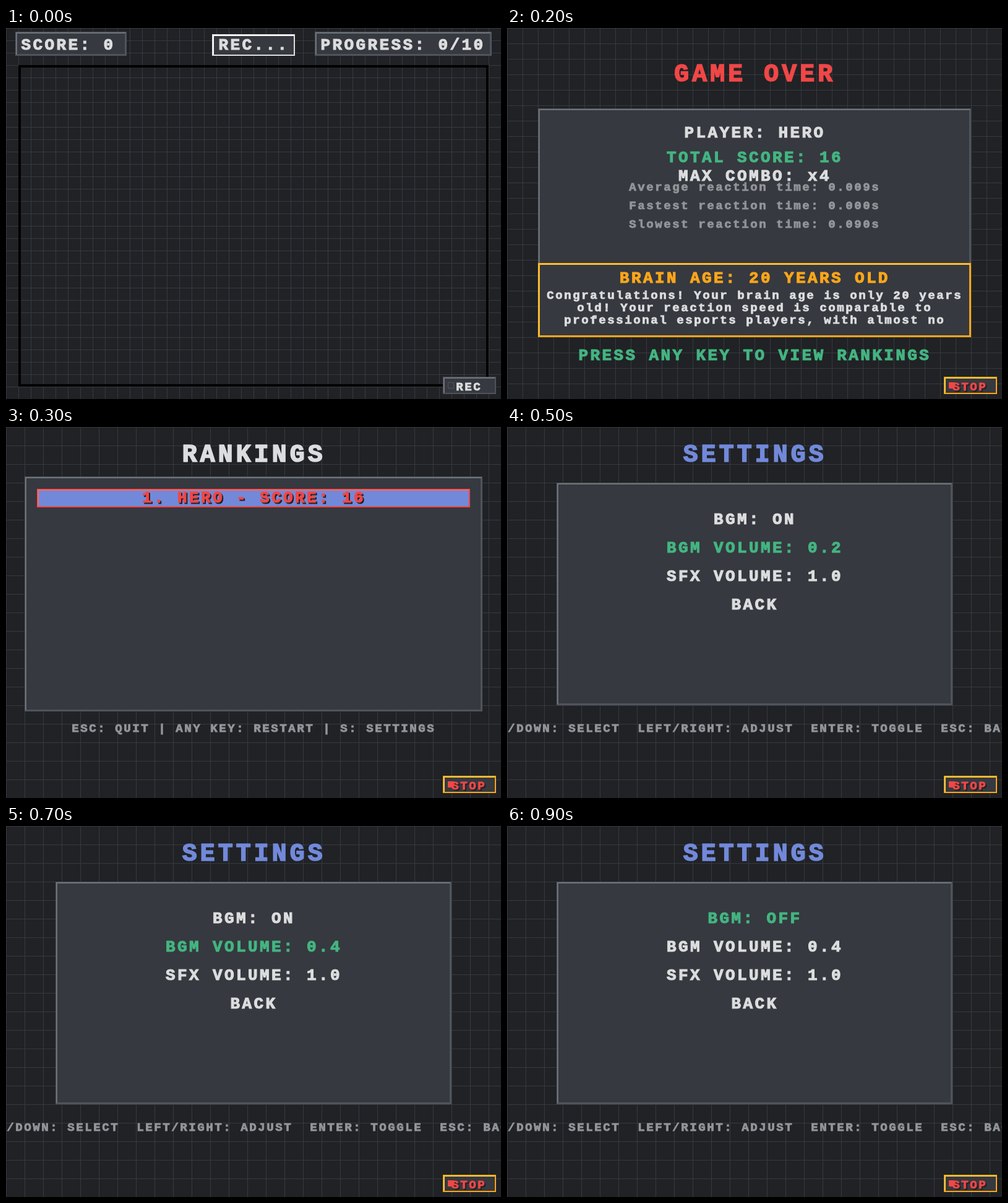
These frames come from a looping animation (800x600 px, 1000 ms). An HTML page with a canvas:

```html
<!DOCTYPE html>
<html lang="en">
<head>
<meta charset="utf-8">
<title>Reaction game</title>
<style>
html, body { margin: 0; width: 100%; height: 100%; overflow: hidden; background: #202225; }
canvas { display: block; }
</style>
</head>
<body>
<canvas id="stage" width="800" height="600"></canvas>
<script>
const ctx = document.getElementById('stage').getContext('2d');
const BG = '#202225', PANEL = '#36393f', WHITE = '#dcddde', GRAY = '#929599';
const RED = '#f04747', GREEN = '#43b581', BLUE = '#7289da', GOLD = '#faa61a';
const EDGE = '#4f545c';
const LIGHT = { [EDGE]: '#6d727a', [WHITE]: '#fafbfc', [GOLD]: '#ffc438', [RED]: '#ff6565' };
const SMALL = 14, BODY = 19, TITLE = 29; // character pitch of each text size

function rect(x, y, w, h, color) {
  ctx.fillStyle = color;
  ctx.fillRect(x, y, w, h);
}

function frame(x, y, w, h, line, color) {
  ctx.strokeStyle = color;
  ctx.lineWidth = line;
  ctx.strokeRect(x + line / 2, y + line / 2, w - line, h - line);
}

// Box with a lighter line along its top and left edges
function bevel(x, y, w, h, line = 3, edge = EDGE, fill = PANEL) {
  rect(x, y, w, h, fill);
  frame(x, y, w, h, line, edge);
  rect(x + 1, y + 1, w - 3, 2, LIGHT[edge]);
  rect(x + 1, y + 1, 2, h - 3, LIGHT[edge]);
}

function text(str, x, y, pitch, color, shadow) {
  const size = pitch * 1.37, gap = pitch - size * 0.6;
  const left = x + gap / 2 - pitch / 16;
  ctx.font = `bold ${size}px "Liberation Mono", monospace`;
  ctx.letterSpacing = gap + 'px';
  ctx.lineWidth = pitch * 0.06;
  const put = (offset, ink) => {
    ctx.fillStyle = ctx.strokeStyle = ink;
    ctx.fillText(str, left + offset, y + offset);
    ctx.strokeText(str, left + offset, y + offset);
  };
  if (shadow) put(2, BG);
  put(0, color);
}

function center(str, y, pitch, color, shadow) {
  text(str, 400 - str.length * pitch / 2, y, pitch, color, shadow);
}

function grid(step) {
  rect(0, 0, 800, 600, BG);
  for (let x = 0; x < 800; x += step) rect(x, 0, 1, 600, PANEL);
  for (let y = 0; y < 600; y += step) rect(0, y, 800, 1, PANEL);
}

function recButton(active) {
  bevel(706, 564, 86, 28, 2, active ? GOLD : EDGE);
  if (active) {
    rect(714, 573, 10, 10, RED);
    text('STOP', 720, 586, SMALL, RED, true);
  } else {
    frame(714, 573, 10, 10, 1, EDGE);
    text('REC', 727, 586, SMALL, WHITE);
  }
}

function game(count) {
  grid(20);
  frame(20, 60, 760, 520, 4, '#000');
  bevel(15, 6, 180, 39);
  text('SCORE: 0', 24, 35, BODY, WHITE);
  bevel(333, 10, 134, 35, 2, WHITE);
  text('REC...', 343, 35, BODY, WHITE);
  bevel(499, 6, 286, 39);
  text(`PROGRESS: ${count}/10`, 508, 35, BODY, WHITE);
  if (count) {
    rect(561, 352, 96, 42, '#55ff55');
    frame(561, 352, 96, 42, 3, '#2dcd2d');
    frame(564, 355, 90, 36, 2, '#91ff91');
    text('GREEN', 574, 378, SMALL, '#0b140b');
  }
}

function gameOver() {
  grid(25);
  center('GAME OVER', 86, TITLE, RED);
  bevel(50, 130, 700, 370);
  center('PLAYER: HERO', 177, BODY, WHITE);
  center('TOTAL SCORE: 16', 217, BODY, GREEN);
  center('MAX COMBO: x4', 247, BODY, WHITE);
  center('Average reaction time: 0.009s', 263, SMALL, GRAY);
  center('Fastest reaction time: 0.000s', 293, SMALL, GRAY);
  center('Slowest reaction time: 0.090s', 323, SMALL, GRAY);
  bevel(50, 380, 700, 120, 3, GOLD);
  center('BRAIN AGE: 20 YEARS OLD', 412, BODY, GOLD);
  center('Congratulations! Your brain age is only 20 years', 438, SMALL, WHITE);
  center('old! Your reaction speed is comparable to', 458, SMALL, WHITE);
  center('professional esports players, with almost no', 478, SMALL, WHITE);
  center('PRESS ANY KEY TO VIEW RANKINGS', 537, BODY, GREEN);
}

function rankings() {
  grid(30);
  center('RANKINGS', 56, TITLE, WHITE);
  bevel(30, 80, 740, 380);
  bevel(50, 100, 700, 30, 2, RED, BLUE);
  center('1. HERO - SCORE: 16', 122, BODY, RED, true);
  center('ESC: QUIT | ANY KEY: RESTART | S: SETTINGS', 493, SMALL, GRAY);
}

function settings(selected, music, volume) {
  grid(30);
  center('SETTINGS', 56, TITLE, BLUE);
  bevel(80, 90, 640, 360);
  ['BGM: ' + music, 'BGM VOLUME: ' + volume, 'SFX VOLUME: 1.0', 'BACK'].forEach((row, i) =>
    center(row, 157 + 46 * i, BODY, i === selected ? GREEN : WHITE));
  center('UP/DOWN: SELECT  LEFT/RIGHT: ADJUST  ENTER: TOGGLE  ESC: BACK', 493, SMALL, GRAY);
}

const scenes = [
  () => game(0),
  () => game(1),
  gameOver,
  rankings,
  () => settings(0, 'ON', '0.2'),
  () => settings(1, 'ON', '0.2'),
  () => settings(1, 'ON', '0.3'),
  () => settings(1, 'ON', '0.4'),
  () => settings(0, 'ON', '0.4'),
  () => settings(0, 'OFF', '0.4')
];

const start = performance.now();
function draw() {
  const step = Math.floor((performance.now() - start) % 1000 / 100);
  scenes[step]();
  recButton(step > 0);
  requestAnimationFrame(draw);
}
draw();
</script>
</body>
</html>
```
